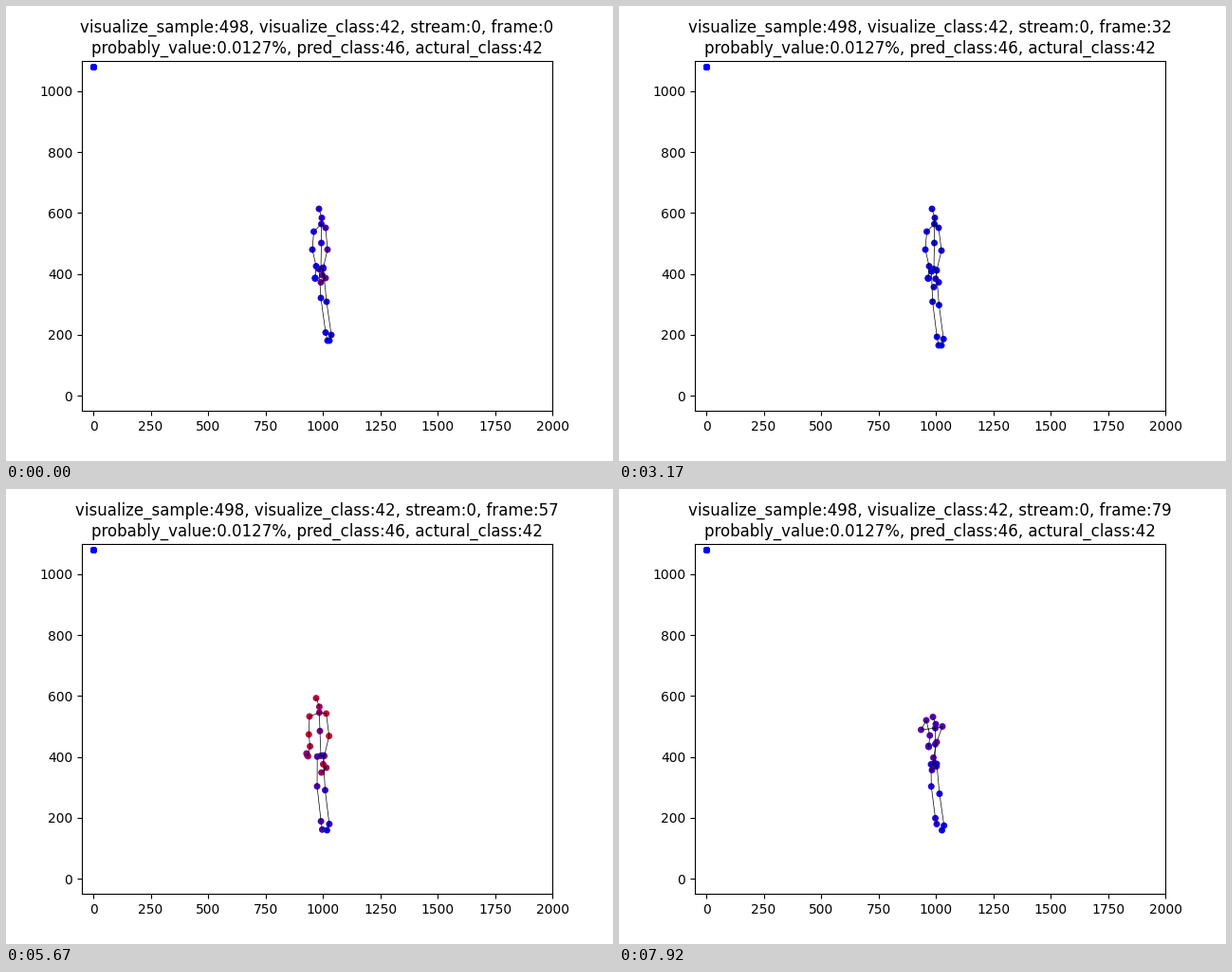
Write a matplotlib script that moves like this. It is 640 px wide and 480 px high and loops after 8 s.

```python
import math

import matplotlib.pyplot as plt
import numpy as np
from matplotlib.animation import FuncAnimation

LOOP_MS, TICK_MS = 8000, 20
SHOWN_FPS, DATA_FPS = 12, 10

plt.rcParams["font.family"] = "DejaVu Sans"

# Standing pose: stage pixels as x + y*1j, each limb from its root to its tip.
STAND = {
    "spine": [332 + 277.5j, 332.5 + 250j, 332.5 + 230j, 333 + 223.5j, 330 + 214j],
    "collar": [324.5 + 238j, 337 + 234j],
    "arm_a": [323 + 257j, 327 + 274.5j, 326 + 287j, 326 + 287.5j, 326 + 287j],
    "arm_b": [339 + 257j, 334.5 + 276j, 333.5 + 284j, 337 + 287j, 332 + 291.5j],
    "leg_a": [330 + 277.5j, 332 + 308j, 337 + 344.5j, 339 + 353j],
    "leg_b": [334.5 + 277j, 338 + 312j, 343 + 347j, 341 + 353j],
}
CHAINS = [
    [*range(5)],
    [2, 5, *range(7, 12)],
    [2, 6, *range(12, 17)],
    [0, *range(17, 21)],
    [0, *range(21, 25)],
]

# Phases of the motion: start, end, then the shift of each limb's root and tip.
SETTLE = 18, 32, {
    "arm_b": (1 + 1j, 5j),
    "leg_a": (-0.5 + 2.5j, -2 + 5j),
    "leg_b": (1.5j, -1 + 5j),
}
SWING = 32, 48, {
    "spine": (2j, -3 - 0.5j),
    "arm_a": (0.5, -8.5 - 8j),
}
SPREAD = 48, 63, {
    "spine": (3j, 11j),
    "collar": (-7 + 3j, 1 + 4.5j),
    "arm_a": (-6.5 + 3j, -1),
    "arm_b": (1 + 4j, 1 + 4j),
    "leg_a": (-2 + 3.5j, -5.5 + 2j),
    "leg_b": (4j, -2.5 + 3j),
}
BOW = 63, 79, {
    "spine": (1 + 7j, 4 + 16j),
    "collar": (1 + 13j, 3 + 12j),
    "arm_a": (7 - 16j, 10 - 8j),
    "arm_b": (-6 + 5j, -3 - 4j),
    "leg_a": (1.5 + 7j, 3.5 - 6.5j),
    "leg_b": (0.5 + 7.5j, 3 - 1j),
}

# Heat at root and tip of each limb for the early and the late pulse.
HEAT = {
    "spine": ((0.2, 0.22), (0.4, 0.8)),
    "collar": ((0.12, 0.35), (0.85, 0.85)),
    "arm_a": ((0.1, 0.03), (0.85, 0.6)),
    "arm_b": ((0.4, 0.55), (0.9, 0.65)),
    "leg_a": ((0.2, 0.03), (0.35, 0.3)),
    "leg_b": ((0.2, 0.03), (0.25, 0.05)),
}


def ease(step, start, end):
    u = min(max((step - start) / (end - start), 0), 1)
    return u * u * (3 - 2 * u)


def pulse(step, center, width):
    return math.exp(-((step - center) / width) ** 2)


def limb_points(name, step):
    pts = np.array(STAND[name], complex)
    along = np.sqrt(np.linspace(0, 1, len(pts)))
    for start, end, shifts in (SETTLE, SWING, SPREAD, BOW):
        root, tip = shifts.get(name, (0, 0))
        pts += ease(step, start, end) * (root + (tip - root) * along)
    return pts


def limb_colors(name, step):
    early, late = (np.linspace(*ends, len(STAND[name])) for ends in HEAT[name])
    heat = early * pulse(step, 8, 16) + late * pulse(step, 62, 18)
    return [(h, 0, 1 - h) for h in heat]


def to_data(pts):
    x = (pts.real - 80) / 496 * 2050 - 50
    y = (427.2 - pts.imag) / 369.6 * 1150 - 50
    return np.column_stack([x, y])


fig, ax = plt.subplots(figsize=(6.4, 4.8), dpi=100)
ax.set_xlim(-50, 2000)
ax.set_ylim(-50, 1100)
title = ax.set_title("\n")
bones = [ax.plot([], [], color="black", lw=0.5)[0] for _ in CHAINS]
# The second body is empty: all its joints pile up in the corner.
ax.scatter([0] * 25, [1080] * 25, s=25, c="blue", linewidths=0)
dots = ax.scatter([], [], s=25, linewidths=0)


def draw(tick):
    # The half-tick lead keeps each change from showing a tick late.
    shown = int((tick + 0.7) * TICK_MS * SHOWN_FPS / 1000)
    step = math.ceil(shown * DATA_FPS / SHOWN_FPS - 0.5)
    title.set_text(
        f"visualize_sample:498, visualize_class:42, stream:0, frame:{step}\n"
        "probably_value:0.0127%, pred_class:46, actural_class:42"
    )
    joints = to_data(np.concatenate([limb_points(n, step) for n in STAND]))
    dots.set_offsets(joints)
    dots.set_facecolor([c for n in STAND for c in limb_colors(n, step)])
    for bone, chain in zip(bones, CHAINS):
        bone.set_data(*joints[chain].T)
    return [title, dots, *bones]


anim = FuncAnimation(fig, draw, frames=LOOP_MS // TICK_MS, interval=TICK_MS,
                     init_func=lambda: draw(0), repeat=True, repeat_delay=0)
plt.show()
```
